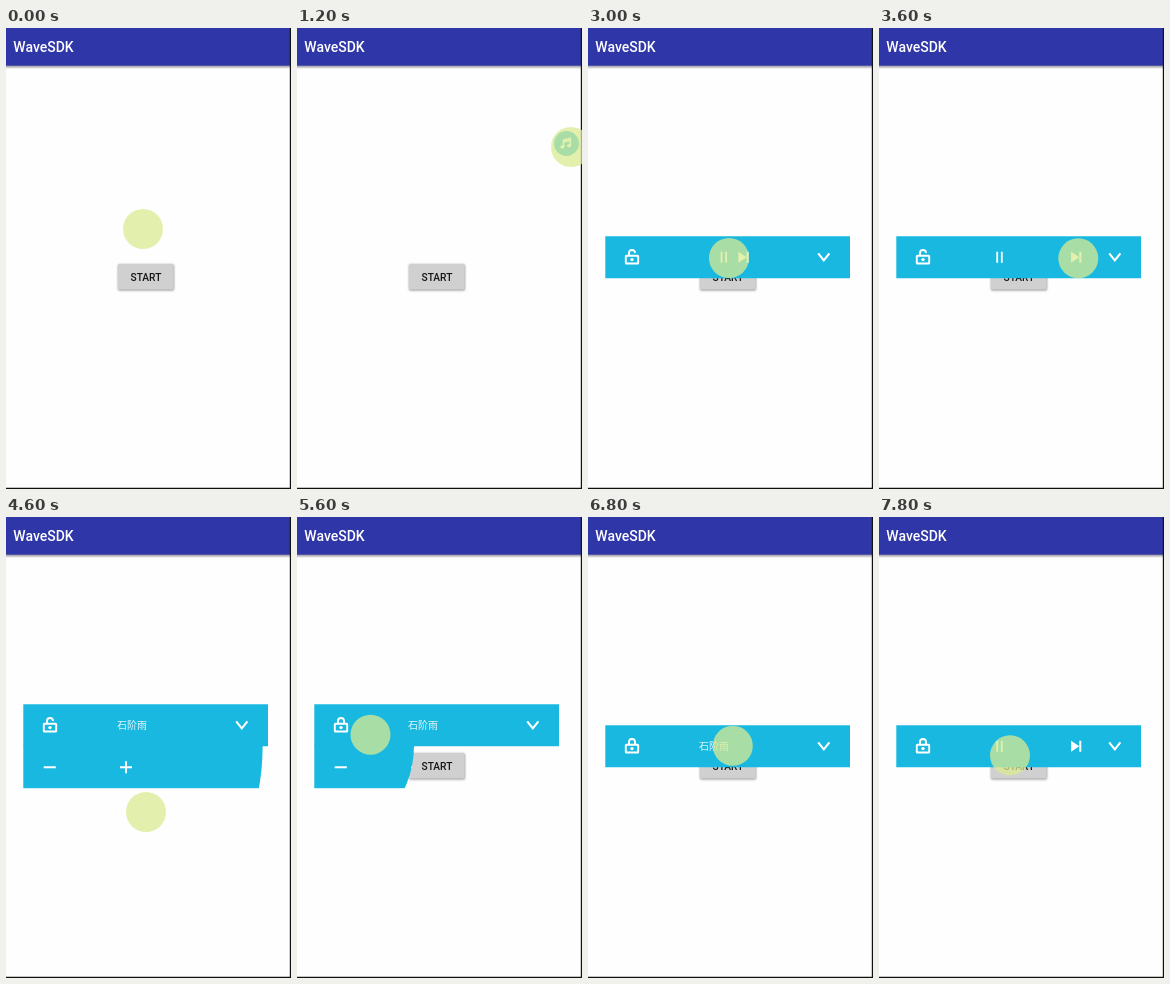
Animation, 285 px wide and 461 px high, one loop 8000 ms. Source, as an HTML page:

```html
<!DOCTYPE html>
<html lang="en">
<head>
<meta charset="utf-8">
<title>Floating player</title>
<style>
  html, body { margin: 0; width: 100%; height: 100%; overflow: hidden; background: #fefefe; }
  svg { display: block; width: 100%; height: 100%; }
  text { font-family: Roboto, sans-serif; font-weight: 500; }
  .line { fill: none; stroke: #fff; stroke-width: 1.9; }
  .solid { fill: #fff; }
  .song { font: 10px "Noto Sans CJK SC", "Noto Sans CJK", sans-serif; fill: #e6f8fc; }
</style>
</head>
<body>
<svg viewBox="0 0 285 461" preserveAspectRatio="none">
  <defs>
    <linearGradient id="shade" x2="0" y2="1">
      <stop stop-color="#7f7f8c"/>
      <stop offset="1" stop-color="#fefefe"/>
    </linearGradient>
    <filter id="soft" x="-10%" y="-20%" width="120%" height="140%">
      <feGaussianBlur stdDeviation=".8"/>
    </filter>
    <clipPath id="reveal"><circle id="revealCircle" cx="17" cy="21"/></clipPath>
  </defs>

  <rect width="285" height="461" fill="#fefefe"/>
  <rect y="37" width="285" height="4" fill="url(#shade)"/>
  <rect width="285" height="37.6" fill="#2f36a8"/>
  <text x="7.3" y="23.6" font-size="14" fill="#fff">WaveSDK</text>

  <rect x="112" y="236.6" width="56" height="25.8" rx="1.5" fill="#999" filter="url(#soft)"/>
  <rect id="button" x="112" y="236" width="55.6" height="25.6" rx="1.5" fill="#d0d0d0"/>
  <text x="140" y="252.5" font-size="10.2" text-anchor="middle" fill="#161616">START</text>
  <path d="M284.400 0V461M0 460.400H285" stroke="#111" stroke-width="1.200"/>

  <g id="ball">
    <circle r="12.5" fill="#18b8e0"/>
    <g transform="scale(.85)">
      <path class="line" d="M-3.5 4V-4L4.5-6V2.5M-3.5-1.8L4.5-3.8"/>
      <ellipse class="solid" cx="-5" cy="4" rx="2.3" ry="1.8"/>
      <ellipse class="solid" cx="3" cy="2.5" rx="2.3" ry="1.8"/>
    </g>
  </g>

  <g id="panel">
    <g clip-path="url(#reveal)">
      <rect x="17.3" y="20" width="244.7" height="43" fill="#18b8e0"/>
      <path class="line" d="M37.7 42H49.8M114 42H126M120 36V48"/>
    </g>
    <polygon id="face" fill="#18b8e0"/>
    <path id="rim" d="M17.3 20.5H262" stroke="#58666f" stroke-width="1.8"/>
    <path id="list" class="line" d="M38-4.5H49M38 0H49M38 4.5H49"/>
    <g id="lock">
      <rect class="line" x="37.8" y="-1.5" width="12.4" height="7.8" rx=".6"/>
      <path id="shackle" class="line"/>
      <circle class="solid" cx="44" cy="2.4" r="1.7"/>
    </g>
    <path id="play" class="solid" d="M136-5L146.5 0L136 5Z"/>
    <path id="pause" class="solid" d="M-3-5.5h1.8v11h-1.8zM1.6-5.5h1.8v11h-1.8z"/>
    <path id="next" class="solid" d="M-5.2-5.5L3 0L-5.2 5.5ZM3-5.5h2v11h-2z"/>
    <text id="song" class="song" x="111" y="4">石阶雨</text>
    <path class="line" style="stroke-width:2.1" d="M230.2-3.8L235.8 3.2L241.4-3.8"/>
  </g>

  <circle id="touch" r="20" fill="#dbeb92" fill-opacity=".74"/>
</svg>
<script>
const LOOP = 8000, STEP = 200;
const OPEN = 2000, PLAY = 3000, TITLE = 4000, LOCK = 5400, UNTITLE = 7400;

const $ = id => document.getElementById(id);
const set = (id, name, value) => $(id).setAttribute(name, value);
const show = (id, on) => set(id, 'visibility', on ? 'inherit' : 'hidden');
const move = (id, x, y) => set(id, 'transform', `translate(${x} ${y})`);
const within = (t, from, to) => t >= from && t < to;
const mix = (a, b, p) => a + (b - a) * p;
const progress = (t, from, to) => Math.min(1, Math.max(0, (t - from) / (to - from)));
const ease = (t, from, to) => {
  const p = progress(t, from, to);
  return p * p * (3 - 2 * p);
};

// Where the finger pauses or turns; it eases from one stop to the next.
const stops = [
  { at: 0, x: 137, y: 201 },
  { at: 400, x: 141, y: 240 },
  { at: 1200, x: 274, y: 119 },
  { at: 2400, x: 114, y: 283.5 },
  { at: PLAY, x: 141, y: 230 },
  { at: 3600, x: 199.3, y: 230.3 },
  { at: 4600, x: 140, y: 295 },
  { at: 5600, x: 73.5, y: 217.7 },
  { at: 6400, x: 140, y: 165 },
  { at: 6800, x: 144.8, y: 228.8 },
  { at: 7200, x: 195, y: 252 },
  { at: 7800, x: 131, y: 238.3 }
];

function drawTouch(t) {
  const to = stops.find(s => s.at >= t);
  const from = stops[Math.max(0, stops.indexOf(to) - 1)];
  const p = to === from ? 0 : ease(t, from.at, to.at);
  move('touch', mix(from.x, to.x, p), mix(from.y, to.y, p));
}

function drawBall(t) {
  const p = ease(t, 1400, OPEN);
  show('ball', within(t, 800, OPEN));
  move('ball', mix(269.5, 140, p), mix(115.5, 229, p));
}

function drawPanel(t) {
  const tilt = Math.sin(progress(t, 1600, 2600) * Math.PI / 2);
  const radius = 284 * (ease(t, TITLE, 4800) - ease(t, 5000, 6000));
  const left = 17.3 + (1 - tilt) * 14;
  show('panel', t >= OPEN);
  set('panel', 'transform', `translate(0 ${radius > 0 ? 208.2 : 229.2}) scale(1 ${tilt})`);
  set('face', 'points', `${left},-21 ${279.3 - left},-21 262,21 17.3,21`);
  set('revealCircle', 'r', radius);
  show('rim', t >= OPEN && tilt < 1);
}

function drawControls(t) {
  const titled = within(t, TITLE, UNTITLE);
  const split = ease(t, 2800, 3400);
  for (const id of ['list', 'play']) show(id, within(t, OPEN, PLAY));
  for (const id of ['pause', 'next']) show(id, t >= PLAY && !titled);
  move('pause', mix(141, 120.3, split), 0);
  move('next', mix(141, 197.3, split), 0);
  show('song', titled);
  show('lock', t >= PLAY);
  set('shackle', 'd', `M41-1.5V-4.2a3 3 0 0 1 6 0${t < LOCK ? '' : 'V-1.5'}`);
}

function frame() {
  const t = Math.floor(performance.now() % LOOP / STEP) * STEP;
  set('button', 'fill', within(t, 400, 800) ? '#bdbdbd' : '#d0d0d0');
  drawTouch(t);
  drawBall(t);
  drawPanel(t);
  drawControls(t);
  requestAnimationFrame(frame);
}
frame();
</script>
</body>
</html>
```
